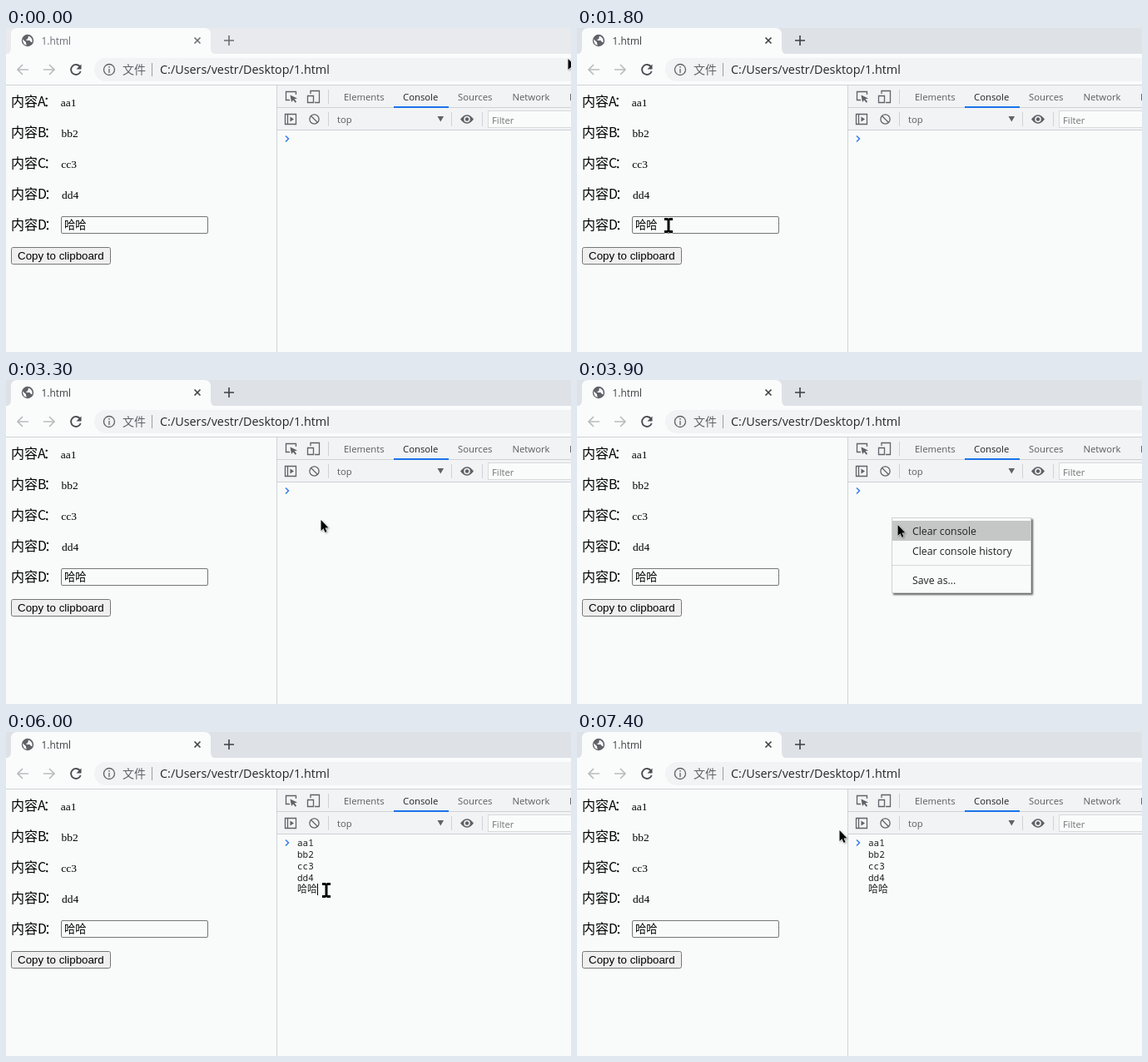
An HTML page that plays this animation: 679 px wide and 389 px high, repeating every 8 s.

```html
<!DOCTYPE html>
<html lang="zh-CN">
<head>
<meta charset="utf-8">
<title>1.html</title>
<style>
html, body { margin: 0; width: 100%; height: 100%; overflow: hidden; background: #f9fbfb; }
svg { display: block; }
text { font-family: "Open Sans", "Noto Sans CJK SC", sans-serif; white-space: pre; }
.cjk { font: 16px "Noto Sans CJK SC", sans-serif; }
.serif { font: 13.5px "Liberation Serif", serif; }
.mono { font: 11px "Noto Sans Mono", "Noto Sans CJK SC", monospace; fill: #222; }
.ui { font-size: 11.3px; fill: #5a5d61; }
.item { font-size: 12.3px; fill: #222; }
.line { fill: none; stroke: #5f6368; stroke-width: 1.3; }
.solid { fill: #5f6368; stroke: none; }
.rule { stroke: #cfd2d6; fill: none; }
#menu { filter: drop-shadow(2.5px 2.5px 1px #0009); }
#arrow { filter: drop-shadow(1px 1px 1px #0005); }
#arrow, #beam { stroke: #fff; paint-order: stroke; }
</style>
</head>
<body>
<svg width="679" height="389" viewBox="0 0 679 389">
  <!-- tab strip -->
  <rect id="strip" width="679" height="32"/>
  <path fill="#fafcfc" d="M-2 32Q6 32 6 24V8Q6 0 14 0H238Q246 0 246 8V24Q246 32 254 32Z"/>
  <g id="globe">
    <circle class="solid" cx="26" cy="15" r="7.2"/>
    <path fill="#fafcfc" d="M20 13.500L24 17V18.500L25 20.500Q20 20 20 13.500ZM27 9.500L29.500 11Q32 13 31.500 17H30L28.500 15H24.500V13.500H26Z"/>
  </g>
  <path id="spinner" d="M26 9A6 6 0 1 1 20 15" fill="none" stroke="#80868b" stroke-width="2"/>
  <g id="tabText">
    <text x="42.500" y="20" font-size="11.9" stroke="none">1.html</text>
    <path d="M226.500 11.500l7 7m0-7l-7 7M262 15h12m-6-6v12" stroke-width="1.6"/>
  </g>

  <!-- address bar -->
  <rect y="31" width="679" height="37" fill="#fafcfc"/>
  <rect x="106" y="36" width="620" height="28" rx="14" fill="#f1f3f4"/>
  <path d="M27 50H14m6-6l-6 6 6 6M45 50H58m-6-6l6 6-6 6" fill="none" stroke="#babcbe" stroke-width="1.7"/>
  <circle id="hover" cx="84" cy="50" r="14" fill="#dfe1e3"/>
  <path d="M89 46.500A6 6 0 1 0 89.700 52" fill="none" stroke="#4a4d51" stroke-width="1.9"/>
  <path d="M90.500 43.500v6h-6Z" fill="#4a4d51"/>
  <circle class="line" cx="124" cy="50" r="6.500"/>
  <path class="line" d="M124 49v5M124 46v1.700"/>
  <text class="cjk" x="140" y="55" style="font-size:14px;fill:#5f6368">文件</text>
  <path d="M175.500 42v16" stroke="#9aa0a6"/>
  <text x="185" y="55" font-size="14.4" fill="#25282c">C:/Users/vestr/Desktop/1.html</text>
  <path class="rule" d="M0 68.500H679"/>

  <!-- page -->
  <rect y="69" width="325" height="320" fill="#f9fbfb"/>
  <g id="rows"></g>
  <rect x="66.500" y="226.500" width="176" height="20" rx="1.5" fill="#f9fbfb" stroke="#767676"/>
  <text class="cjk" x="70" y="241" style="font-size:13.333px">哈哈</text>
  <rect id="button" x="6.500" y="263.500" width="119" height="20" rx="2"/>
  <text x="14" y="278" style="font:13.333px 'Liberation Sans',sans-serif">Copy to clipboard</text>

  <!-- developer tools -->
  <rect x="326" y="69" width="353" height="53" fill="#f1f3f4"/>
  <path class="rule" d="M325.500 69V389M326 95.500H679M326 122.500H679M387.500 74v17m0 10v17M535.500 101v17M572.500 101v17"/>
  <path class="line" d="M341 86.500H336.500V76.500H348.500V80M366 79V75.500H376.500V89.500H371M362.500 81.500h7v8h-7ZM335.500 103.500h13v12h-13Zm3 0v12M366.500 105.500l8 8"/>
  <circle class="line" cx="370.500" cy="109.500" r="5.600"/>
  <path class="solid" d="M341.500 80.500l8.500 4-3.500 1 2.500 2.500-1 2-3-3.500-2 2.500ZM341.500 106.500l4.500 3-4.500 3ZM518.500 106H526l-3.700 6.500ZM546 109.500Q554 99 562 109.500Q554 120 546 109.500Z"/>
  <circle cx="554" cy="109.500" r="3" fill="#5f6368" stroke="#f1f3f4" stroke-width="1.5"/>
  <text class="ui" x="406" y="87">Elements</text>
  <text class="ui" x="477" y="87" style="fill:#222">Console</text>
  <text class="ui" x="543" y="87">Sources</text>
  <text class="ui" x="608.500" y="87">Network</text>
  <text class="ui" x="677" y="87">Performance</text>
  <rect x="466" y="94" width="66" height="2" fill="#1a73e8"/>
  <text class="ui" x="398" y="114">top</text>
  <rect x="579.500" y="99.500" width="120" height="20" fill="#fafcfc" stroke="#d8dadc"/>
  <text class="ui" x="584" y="115" style="fill:#757575">Filter</text>
  <path d="M336 129.500l3.500 3.500-3.500 3.500" fill="none" stroke="#367cf1" stroke-width="1.5"/>
  <g id="pasted"></g>
  <rect id="caret" width="1" height="14"/>

  <g id="menu">
    <rect x="378.500" y="165.500" width="167" height="90" fill="#f9fbfb" stroke="#cfd1d1"/>
    <rect id="highlight" x="379" y="169" width="166" height="24" fill="#c5c6c6"/>
    <path d="M379 222.500H545" stroke="#d5d7d7"/>
    <text class="item" x="403" y="186">Clear console</text>
    <text class="item" x="403" y="210">Clear console history</text>
    <text class="item" x="403" y="245">Save as...</text>
  </g>

  <path id="arrow" d="M.5 1V14L3.500 11.200 5.500 16 7.500 15 5.500 10.500H9.500Z"/>
  <path id="beam" d="M-5-9H-1L0-8 1-9H5V-6H1.500V6H5V9H1L0 8-1 9H-5V6H-1.500V-6H-5Z"/>
</svg>
<script>
const $ = id => document.getElementById(id);
const show = (id, on) => $(id).style.display = on ? '' : 'none';
const set = (id, attrs) => { for (const k in attrs) $(id).setAttribute(k, attrs[k]); };

const values = ['aa1', 'bb2', 'cc3', 'dd4'];
$('rows').innerHTML = [...'ABCDD'].map((name, i) =>
  `<text class="cjk" x="6" y="${94 + 37 * i}">内容${name}<tspan dx="-3">：</tspan><tspan class="serif" dx="5">${values[i] || ''}</tspan></text>`
).join('');
$('pasted').innerHTML = [...values, '<tspan font-size="12">哈哈</tspan>'].map((s, i) =>
  `<text class="mono" x="350" y="${137 + 14 * i}">${s}</text>`
).join('');

// Each move eases to a resting place; sag bends its way downwards.
const moves = [
  { from: 0, to: 1000, x: 84, y: 48, sag: 75 },
  { from: 1400, to: 1800, x: 110, y: 237 },
  { from: 1900, to: 2300, x: 98, y: 275 },
  { from: 2700, to: 3300, x: 378, y: 167 },
  { from: 3800, to: 3900, x: 385, y: 173 },
  { from: 4200, to: 4500, x: 372, y: 175 },
  { from: 5900, to: 6300, x: 402, y: 195, sag: 6 },
  { from: 6700, to: 7100, x: 422, y: 205 },
  { from: 7200, to: 7400, x: 315, y: 117 }
];

function pointer(t) {
  let x = 675, y = 36;
  for (const m of moves) {
    const u = Math.min(1, Math.max(0, (t - m.from) / (m.to - m.from)));
    const k = 1 - (1 - u) ** 2;
    x += (m.x - x) * k;
    y += (m.y - y) * k + (m.sag || 0) * Math.sin(Math.PI * k);
  }
  return [Math.round(x), Math.round(y)];
}

function draw(now) {
  const t = Math.floor(now % 8000 / 100) * 100; // ten steps a second
  const within = (a, b) => t >= a && t < b;
  const [x, y] = pointer(t);
  const inBox = (l, top, r, b) => x > l && x < r && y > top && y < b;
  const focused = t >= 400, pasted = t >= 5600;

  set('strip', { fill: focused ? '#dee1e6' : '#e8eaed' });
  const ink = focused ? '#3c4043' : '#6b6f74';
  set('tabText', { fill: ink, stroke: ink });
  const loading = within(1300, 1400);
  show('globe', !loading);
  show('spinner', loading);
  show('hover', Math.hypot(x - 84, y - 50) < 14);

  const [fill, stroke] = within(2500, 2700) ? ['#f5f5f5', '#8d8d8d']
    : inBox(6, 263, 126, 284) ? ['#e5e5e5', '#4f4f4f'] : ['#efefef', '#767676'];
  set('button', { fill, stroke });

  show('menu', within(3600, 4200));
  show('highlight', t >= 3900);
  show('pasted', pasted);
  const blinkStart = pasted ? 5600 : 4800;
  show('caret', within(4800, 7400) && (t - blinkStart) % 1000 < 500);
  set('caret', { x: pasted ? 374 : 350, y: pasted ? 182 : 126 });

  const beam = inBox(66, 226, 243, 247) || pasted && inBox(350, 126, 679, 197);
  show('beam', beam);
  show('arrow', !beam);
  set(beam ? 'beam' : 'arrow', { transform: `translate(${x} ${y})` });
  requestAnimationFrame(draw);
}
draw(performance.now());
</script>
</body>
</html>
```
